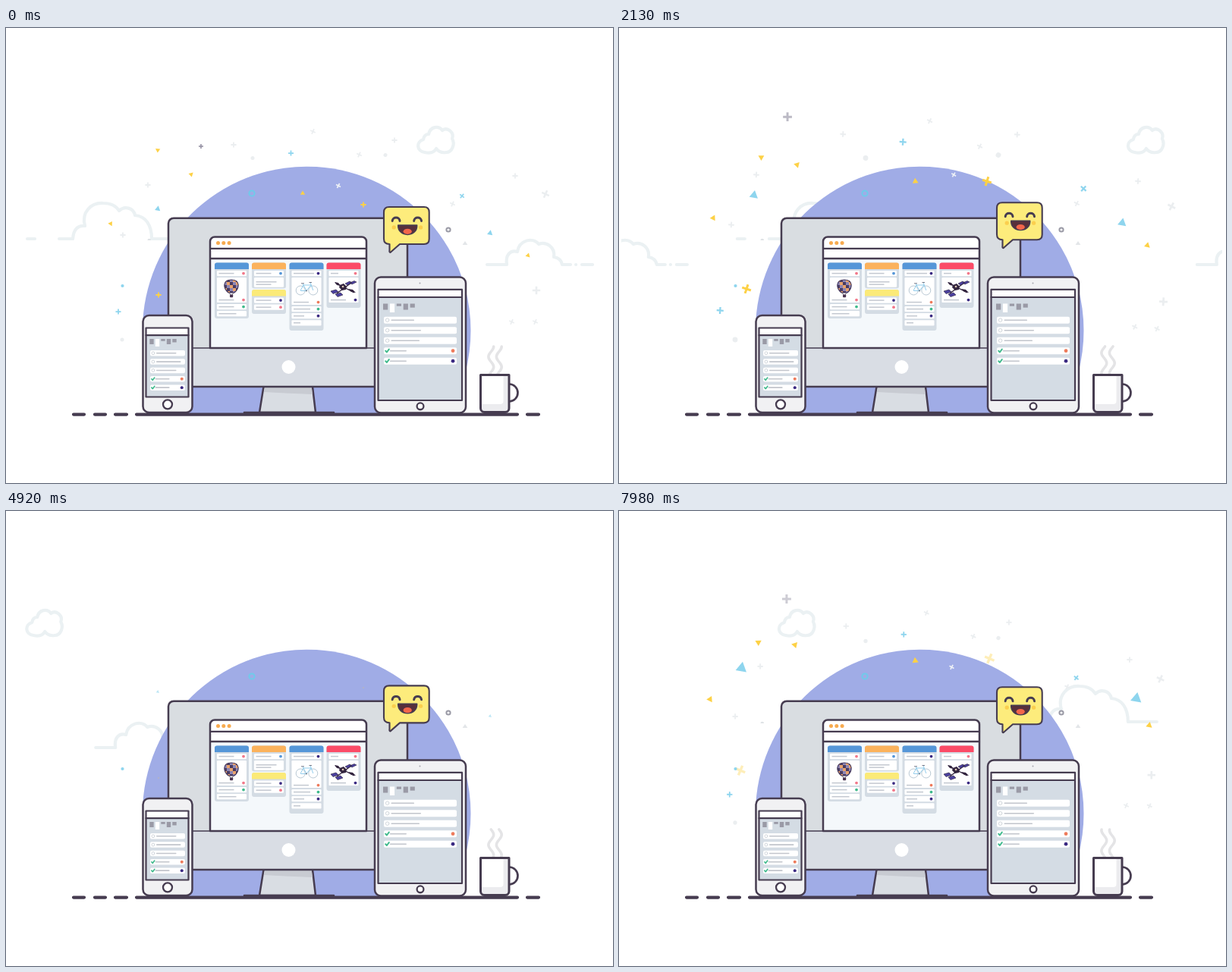
Animation of 800 by 600 pixels, one loop 8 s. Source, as an HTML page with a canvas:

```html
<!DOCTYPE html>
<html lang="en">
<head>
<meta charset="utf-8">
<title>Devices and confetti</title>
<style>
html, body { margin: 0; width: 100%; height: 100%; overflow: hidden; background: #fff; }
canvas { display: block; }
</style>
</head>
<body>
<canvas id="stage" width="800" height="600"></canvas>
<script>
const ctx = document.getElementById('stage').getContext('2d');
const LOOP = 8000, TAU = Math.PI * 2, DEG = TAU / 360;
const SUN = { x: 396.2, y: 399, r: 216.3 };
const INK = '#463c50', PALE = '#ebeef0', CLOUD = '#ebf1f3', PANEL = '#d4dce4', LINE = '#c3c8d0';
const BLUE = '#5596d8', SKY = '#8ed5ee', YELLOW = '#fdd146', CORAL = '#ee7b5c', NAVY = '#3b2a82',
      GREEN = '#3fba8c', GRAY = '#9a9aa6', PINK = '#f2788a';
const clamp = v => Math.max(0, Math.min(1, v));

// ---- drawing helpers ----
function paint(path, fill, stroke, width = 2.5) {
  if (fill) { ctx.fillStyle = fill; ctx.fill(path); }
  if (stroke) { ctx.strokeStyle = stroke; ctx.lineWidth = width; ctx.stroke(path); }
}
const shape = (d, fill, stroke, width) => paint(new Path2D(d), fill, stroke, width);
function box(x, y, w, h, r, fill, stroke, width) {
  const p = new Path2D();
  p.roundRect(x, y, w, h, r);
  paint(p, fill, stroke, width);
}
function disc(x, y, r, fill, stroke, width) {
  const p = new Path2D();
  p.arc(x, y, r, 0, TAU);
  paint(p, fill, stroke, width);
}
const hline = (x1, x2, y, color = LINE, width = 1.5) => shape(`M${x1} ${y}H${x2}`, null, color, width);

// ---- clouds ----
const CLOUDS = new Path2D(
  'M28 278H38M70 278H88C89 264 96 260 104 261C99 243 112 230 128 231C140 231 146 236 149 241' +
  'C156 234 168 237 170 247C184 248 192 260 192 278H230' +
  'M634 312H660C658 300 664 292 674 295C676 280 694 275 702 285C712 281 724 289 722 302' +
  'C729 303 732 307 733 312H744M751 312h.1M759 312H773' +
  'M567 159C563 166 556 165 552 164C541 163 540 150 550 147C551 140 555 140 557 140' +
  'C559 130 570 128 575 135C582 130 591 138 588 146C592 153 588 164 580 164C574 165 570 163 567 159');

function drawClouds(t) {
  ctx.save();
  ctx.beginPath();
  ctx.rect(3, 0, 792, 600);
  ctx.clip();
  ctx.translate(t * 0.06, 0);
  paint(CLOUDS, null, CLOUD, 4.2);
  ctx.translate(-811, 0);
  paint(CLOUDS, null, CLOUD, 4.2);
  ctx.restore();
}

// ---- confetti ----
// Pieces pop in, wait until `start`, drift at `speed` px/s while growing, then fade out.
// Each piece is [x, y] plus a heading in degrees where the group's own rule does not apply.
const outward = (x, y) => Math.atan2(y - SUN.y, x - SUN.x) / DEG;
const sweep = x => Math.max(-114, (x - 594) * .37);
const SLOW = { kind: 'plus', period: 6480, start: 1390, fade: 3000, speed: 20, heading: outward, spin: 5 };
const FAINT = { ...SLOW, color: PALE, size: 3.6, grow: .08, tilt: i => i % 2 * 24, heading: sweep };
const BURSTS = [
  { kind: 'plus', color: '#8f8c9e', size: 3, period: 5780, start: 0, fade: 1950, speed: 24.5, grow: .45,
    pieces: [[257, 156, -132]] },
  { kind: 'plus', color: YELLOW, size: 3.6, period: 5400, start: 290, fade: 2300, speed: 18.4, grow: .38, spin: 10,
    pieces: [[471, 233], [201, 352]] },
  { kind: 'tri', color: YELLOW, size: 3, period: 5680, start: 1570, fade: 3050, speed: 28, grow: .45, spin: -8,
    tilt: i => i * 16, pieces: [[391, 218], [688, 300, -58], [138, 258], [244, 193], [200, 161, 143]] },
  { kind: 'tri', color: SKY, size: 3.5, period: 5210, start: 1265, fade: 2770, speed: 33, grow: .66,
    tilt: () => 10, pieces: [[200, 238.5], [638, 270.5]] },
  { ...SLOW, color: SKY, size: 3.5, grow: .4, tilt: i => i % 2 * 38, pieces: [[375.5, 165], [601, 221.5], [148, 374]] },
  { ...SLOW, color: '#eef1f6', size: 3.4, grow: 0, tilt: () => 28, pieces: [[438, 208]] },
  { ...FAINT, pieces: [[300, 154], [404.5, 136.5], [187, 207], [465.5, 167], [154, 273], [588.5, 232],
    [512, 148], [666.5, 387.5], [671, 195], [697.5, 387.5]] },
  { ...FAINT, size: 5.2, speed: 32, pieces: [[699, 346], [711, 219]] },
  { ...FAINT, kind: 'dot', size: 2.5, speed: 0, grow: .5, pieces: [[325, 171.5], [500, 167.5], [153, 411]] }
];

function drawPiece(kind, color, s) {
  if (kind === 'plus') {
    shape(`M${-s} 0H${s}M0 ${-s}V${s}`, null, color, s * .5);
  } else if (kind === 'tri') {
    shape(`M0 ${-s * 1.2}L${s * 1.04} ${s * .6}H${-s * 1.04}Z`, color);
  } else {
    disc(0, 0, s, color);
  }
}

function drawBurst({ kind, color, size, period, start, fade, speed, grow, pieces,
                     spin = 0, tilt = () => 0, heading = outward }, t) {
  const phase = t < 4000 ? t : t - period;
  const enter = clamp((phase + 700) / 700);
  const moved = Math.max(0, phase - start) / 1000;
  ctx.globalAlpha = enter * clamp(1 - (phase - fade) / 450);
  pieces.forEach(([x, y, angle = heading(x, y)], i) => {
    ctx.save();
    ctx.translate(x + speed * moved * Math.cos(angle * DEG), y + speed * moved * Math.sin(angle * DEG));
    ctx.rotate((tilt(i) + spin * moved) * DEG);
    drawPiece(kind, color, size * enter * (1 + grow * moved));
    ctx.restore();
  });
  ctx.globalAlpha = 1;
}

function drawConfetti(t) {
  ctx.lineCap = 'butt';
  BURSTS.forEach(burst => drawBurst(burst, t));
  disc(324, 218, 3.6, null, '#6fcbea', 2);
  disc(583, 266, 2.6, null, GRAY, 2);
  disc(153.5, 340, 2.1, SKY);
  shape('M605 281l3.4 5h-6.8z', '#e3e6e9');
  if (t < 3300 || t > 6000) shape('M186.5 280a2.3 2.3 0 0 1 4.6 0z', '#dfe3e6');
}

// ---- monitor ----
const CARD_HEIGHT = { row: 7.2, note: 12.6, picture: 33, tall: 36 };

// A board column: cards stack under the header, each given as [kind, line length, dot colour].
function column(x, y, h, color, cards) {
  box(x, y, 45, h, 3, PANEL);
  box(x, y, 45, 8.5, [3, 3, 0, 0], color);
  let top = y + 10.5;
  for (const [kind, length, dot] of cards) {
    const height = CARD_HEIGHT[kind];
    const lineY = kind === 'row' ? top + 3.6 : top + height - 3.5;
    box(x + 3, top, 39, height, 1.2, '#fff');
    hline(x + 5.5, x + 5.5 + length, lineY);
    if (kind === 'note') hline(x + 5.5, x + 12.5 + length, lineY - 3.4);
    if (dot) disc(x + 38, lineY, 1.9, dot);
    top += height + 1.9;
  }
}

function drawBalloon() {
  const envelope = new Path2D('M297 332C309 332 308 343 301 349H293C286 343 285 332 297 332Z');
  const patches = ['#e9a26c', '#4a3c62', '#8d86b4'];
  ctx.save();
  ctx.clip(envelope);
  for (let row = 0; row < 5; row++) {
    for (let col = 0; col < 5; col++) {
      box(287 + col * 4, 331 + row * 4, 4, 4, 0, patches[(col + row * 2) % 3]);
    }
  }
  ctx.restore();
  paint(envelope, null, '#3b2f56', 1.1);
  shape('M294 349l2 3M300 349l-2 3', null, INK, .8);
  box(295, 351.5, 4.2, 3.8, 1, '#4a3550');
}
function drawBicycle() {
  disc(388.2, 346, 6, null, '#a9bcc9', .8);
  disc(404.8, 346, 6, null, '#a9bcc9', .8);
  shape('M388.2 346L392 339H402L396 346.5H388.2M396 346.5L391 337M404.8 346L401 335.5', null, '#86c8ea', .9);
  shape('M389 336.8h4M399.5 335.5h3.5', null, '#6b6b7a', .9);
  disc(396, 346.5, 1.1, '#7b8493');
}
function drawSatellite() {
  shape('M434 336L459 349M436 350L455 336', null, '#33253f', 1.4);
  shape('M433 335l5 1 3 4-5-1zM451 344l6 1 4 4-6-1z', '#33253f');
  shape('M428 347l7-2 3 3-7 2.5zM434 351l7-2 3 3-7 2.5zM447 337l6-3 3 2-6 3zM453 336l6-2.5 3 1.5-6 3z',
    '#4b40a0', '#2b2038', .6);
  shape('M440 339l5-2 4 4-1 4-5 1-4-4z', '#33253f');
  disc(444, 341, 1.3, '#dcc9b4');
}

function drawMonitor() {
  shape('M339.5 473H404L408 507H334Z', '#d9dde3', INK);
  shape('M341 474.3H402.8L403.8 483L368 481.5L340.3 480Z', '#c8cbd2');
  box(214, 250.7, 315, 222.3, [7, 7, 3, 3], '#d9dde1');
  box(214, 422, 315, 51, [0, 0, 3, 3], '#d9dde4');
  box(214, 250.7, 315, 222.3, [7, 7, 3, 3], null, INK);
  disc(372.5, 447, 9, '#fff');

  box(269, 275.5, 206, 146.5, [6, 6, 0, 0], '#f4f8fb');
  box(269, 275.5, 206, 28.5, [6, 6, 0, 0], '#fff');
  box(269, 275.5, 206, 146.5, [6, 6, 0, 0], null, INK);
  hline(269, 475, 290.8, INK, 2.3);
  hline(269, 475, 304, INK, 2.3);
  hline(214, 529, 422, INK);
  for (let i = 0; i < 3; i++) disc(279.5 + i * 7.3, 283.6, 2.5, '#f7ab50');

  column(275, 309.5, 73.5, BLUE, [['row', 20, PINK], ['picture', 20, PINK], ['row', 20, GREEN], ['row', 23]]);
  column(324, 309.5, 34, '#fbb25c', [['row', 20, BLUE], ['note', 20]]);
  column(324, 345, 32, '#fbea78', [['row', 20, NAVY], ['row', 20, PINK]]);
  column(373.5, 309.5, 89.5, BLUE,
    [['row', 27, NAVY], ['tall', 20, CORAL], ['row', 22, GREEN], ['row', 14, NAVY], ['row', 9]]);
  column(422.5, 309.5, 59.5, '#fb4b67', [['row', 10, PINK], ['picture', 20, NAVY]]);
  drawBalloon();
  drawBicycle();
  drawSatellite();
}

// ---- phone and tablet ----
function device(x, y, w, h, screen, barH, button) {
  const [sx, sy, sw, sh] = screen;
  box(x, y, w, h, 8, '#f1f1f3', INK);
  box(sx, sy, sw, sh, 0, PANEL);
  box(sx, sy, sw, barH, 0, '#fff');
  box(sx, sy, sw, sh, 0, null, INK, 2.2);
  hline(sx, sx + sw, sy + barH, INK, 2.2);
  disc(x + w / 2, (sy + sh + y + h) / 2 - .4, button, '#fff', INK, 2.3);
}
function bars(x, y, step, k) {
  [7, 10, 2.8, 7, 4.5].forEach((h, i) => box(x + i * step, y, 5.4 * k, h * k, 0, i === 1 ? '#fff' : GRAY));
}
// Three open tasks, then two finished ones; k scales the marks.
function taskList(x, y, w, rowH, step, k, lengths) {
  for (let i = 0; i < 5; i++) {
    const top = y + i * step, mid = top + rowH / 2, done = i > 2;
    const lineX = x + (done ? 8 : 9.5) * k;
    box(x, top, w, rowH, 2, '#fff');
    hline(lineX, lineX + (done ? 19 * k : lengths[i]), mid, '#c2c5cc', 1.6);
    if (done) {
      shape(`M${x + 2 * k} ${mid}l${1.6 * k} ${1.7 * k}l${2.7 * k} ${-3.6 * k}`, null, GREEN, 1.8 * k);
      disc(x + w - 4.6 * k, mid, 2.2 * k, i === 3 ? CORAL : NAVY);
    } else {
      disc(x + 4.3 * k, mid, 2.1 * k, '#fff', '#ccd2d8', .9);
    }
  }
}
function drawPhone() {
  device(180.5, 379, 65, 128, [184.5, 395.5, 56, 91], 9.7, 6);
  bars(189.3, 410, 7.5, 1);
  taskList(190, 425, 46, 7.5, 11.35, .92, [25, 31, 25]);
}
function drawTablet() {
  device(486, 328.5, 120, 179, [490.5, 344.8, 110.5, 146.2], 10.2, 4.4);
  disc(545.5, 336.5, 1, '#a9a6b0');
  bars(497, 363.5, 8.9, 1.15);
  taskList(498, 380.7, 96, 9, 13.5, 1.08, [29, 38, 36]);
}

// ---- mug and bubble ----
function drawMug(t) {
  for (const x of [639.3, 649.8]) {
    const steam = new Path2D();
    for (let y = 420; y <= 456; y += 1.5) {
      steam.lineTo(x + 3.4 * Math.cos(((y - 420) / 27 + t / 1790) * TAU), y);
    }
    paint(steam, null, '#e4e4e6', 3.6);
  }
  disc(663, 481, 11.5, '#fff', INK, 2.7);
  box(625.5, 457.5, 37.5, 49, [0, 0, 5, 5], '#ececef');
  box(627, 459, 28.5, 37, [0, 0, 4, 0], '#fff');
  box(625.5, 457.5, 37.5, 49, [0, 0, 5, 5], null, INK, 3);
}

function drawBubble(t) {
  const lift = (1 + Math.cos(t / 3600 * TAU)) / 2;
  ctx.save();
  ctx.translate(0, -5.8 * (1 - lift * lift));
  shape('M505 236H551Q557.7 236 557.7 243V278Q557.7 285 551 285H519L506.5 296Q505 296 505.5 293V285' +
        'Q498 285 498 278V243Q498 236 505 236Z', '#fdec7c', INK, 2.1);
  shape('M509.2 254.4C509.5 248.6 518.7 248.6 519 254.4M537.7 254.4C538 248.6 547.2 248.6 547.5 254.4',
    null, INK, 3);
  disc(511.2, 262.9, 2.6, '#fbcf4e');
  disc(546.6, 262.9, 2.6, '#fbcf4e');
  const mouth = new Path2D('M516.7 260H541.7C542.5 276.5 516 276.5 516.7 260Z');
  paint(mouth, '#57303b', INK, 1.5);
  ctx.clip(mouth);
  const tongue = new Path2D();
  tongue.ellipse(529.2, 268.3, 5.6, 3.6, 0, 0, TAU);
  paint(tongue, '#f2664a');
  ctx.restore();
}

function drawScene(t) {
  ctx.clearRect(0, 0, 800, 600);
  ctx.lineCap = ctx.lineJoin = 'round';
  drawClouds(t);
  const sun = new Path2D(), horizon = Math.asin(109 / SUN.r);
  sun.arc(SUN.x, SUN.y, SUN.r, Math.PI - horizon, horizon);
  paint(sun, '#a0ace6');
  drawConfetti(t);
  drawMonitor();
  ctx.lineCap = 'round';
  shape('M89 509.6H103M117 509.6H131M144 509.6H159M172 509.6H674M687 509.6H702', null, INK, 4.2);
  hline(314, 432, 507, INK, 2.6);
  drawPhone();
  drawTablet();
  drawMug(t);
  drawBubble(t);
}

function frame() {
  drawScene(performance.now() % LOOP);
  requestAnimationFrame(frame);
}
frame();
</script>
</body>
</html>
```
